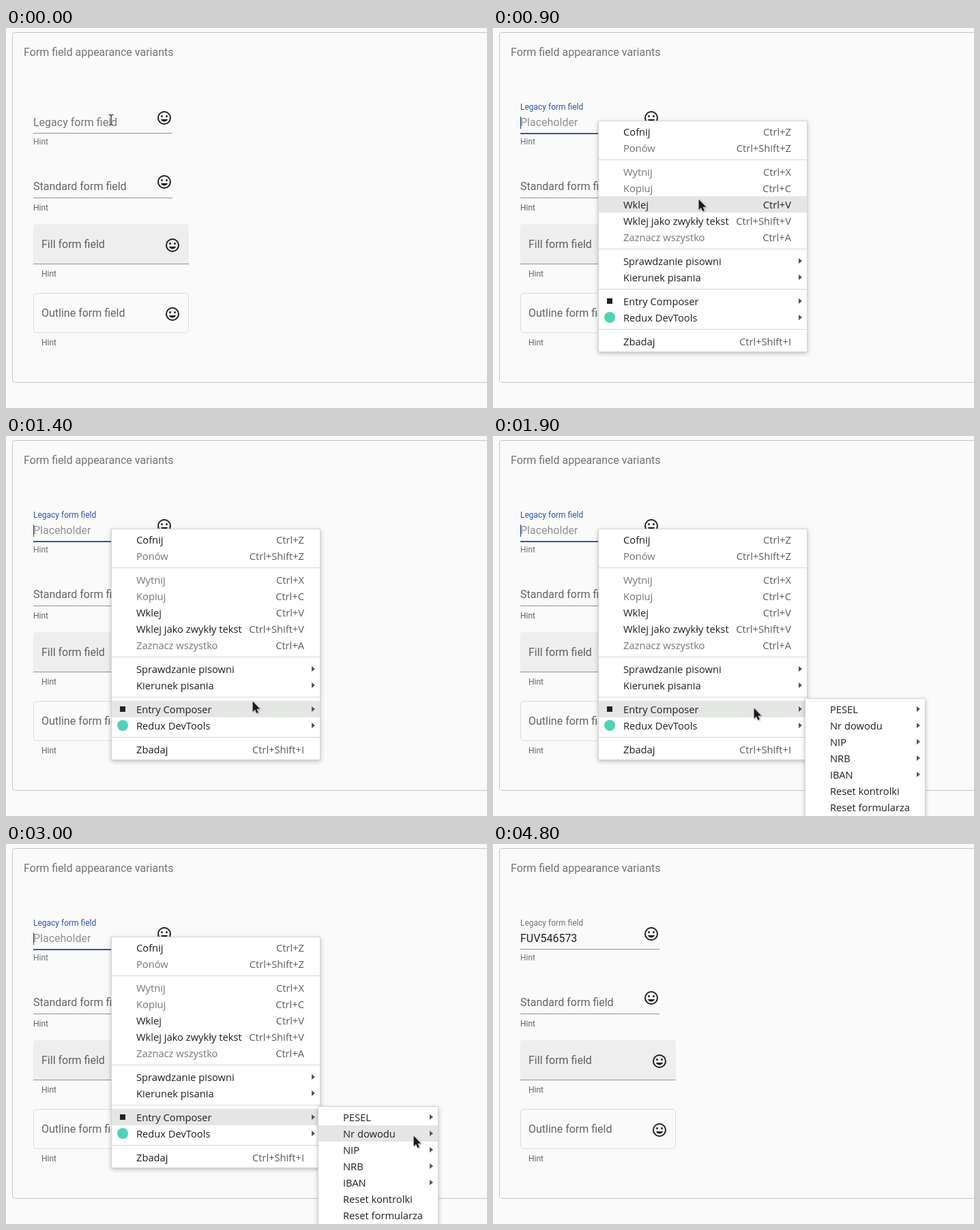
An HTML page that plays this animation: 705 by 558 pixels, repeating every 5.5 s.

```html
<!DOCTYPE html>
<html lang="en">
<head>
<meta charset="utf-8">
<title>Form field appearance variants</title>
<style>
  html, body { margin: 0; width: 100%; height: 100%; overflow: hidden; background: #fafafa; }
  svg { display: block; width: 705px; height: 558px; font: 16px Roboto, sans-serif; }
  text { white-space: pre; }
  .soft { fill: rgba(0, 0, 0, .54); }
  .label { fill: rgba(0, 0, 0, .6); }
  .hint { font-size: 12px; }
  .ink { fill: #212121; }
  .menu { font: 14.7px "Open Sans", "Noto Sans", sans-serif; fill: #1f1f1f; }
  .menu .panel { fill: #fff; stroke: #d4d4d4; filter: drop-shadow(0 2px 3px rgba(0, 0, 0, .24)); }
  .menu .hover { fill: #e4e6e4; }
  .menu .key { fill: #5c5c5c; text-anchor: end; }
  .menu .key.on { fill: #1f1f1f; }
  .menu .off { fill: #767676; }
  .menu .arrow { fill: #555; }
  #arrow { filter: drop-shadow(1px 1px 1px rgba(0, 0, 0, .3)); }
</style>
</head>
<body>
<svg id="stage" viewBox="0 0 705 558"></svg>
<script>
const LOOP = 5500, BLUE = [42, 87, 171];
const stage = document.getElementById('stage');

function add(parent, tag, attrs = {}, content) {
  const node = document.createElementNS('http://www.w3.org/2000/svg', tag);
  for (const name in attrs) node.setAttribute(name, attrs[name]);
  if (content) node.textContent = content;
  parent.append(node);
  return node;
}
const set = (node, attrs) => { for (const name in attrs) node.setAttribute(name, attrs[name]); };
const show = (node, on) => node.setAttribute('visibility', on ? 'visible' : 'hidden');
const text = (x, y, cls, content, parent = stage) => add(parent, 'text', { x, y, class: cls }, content);
const rect = (x, y, width, height, attrs, parent = stage) =>
  add(parent, 'rect', { x, y, width, height, ...attrs });

function smiley(x, y) {
  const face = add(stage, 'g', { transform: `translate(${x - 12} ${y - 12})`, class: 'ink' });
  add(face, 'circle', { cx: 12, cy: 12, r: 9, fill: 'none', stroke: '#212121', 'stroke-width': 2 });
  for (const cx of [8.5, 15.5]) add(face, 'circle', { cx, cy: 9.5, r: 1.5 });
  add(face, 'path', { d: 'M12 17.5c2.33 0 4.31-1.46 5.11-3.5H6.89c.8 2.04 2.78 3.5 5.11 3.5z' });
}

// Page
const LINE = { fill: '#919191' };
rect(9.5, 6.5, 720, 514, { rx: 4, fill: 'none', stroke: '#c4c4c4' });
text(26, 41, 'soft', 'Form field appearance variants');

rect(40, 154, 204, 1, LINE);
const underline = rect(40, 154, 204, 2, {});
const legacyLabel = text(40, 144, '', 'Legacy form field');
const placeholder = text(40, 144, '', 'Placeholder');
placeholder.setAttribute('fill', 'rgba(0,0,0,.42)');
const value = text(40, 144, 'ink', 'FUV546573');
const caret = rect(40, 130, 1, 18, { fill: '#1d3f80' });
text(40, 171, 'soft hint', 'Hint');

text(40, 238, 'label', 'Standard form field');
rect(40, 249, 204, 1, LINE);
text(40, 268, 'label hint', 'Hint');

add(stage, 'path', { d: 'M40 347V292q0-4 4-4H264q4 0 4 4V347z', fill: '#eee' });
rect(40, 346, 228, 1, LINE);
text(52, 323, 'label', 'Fill form field');
text(52, 365, 'label hint', 'Hint');

rect(40.5, 389.5, 227, 58, { rx: 4.5, fill: 'none', stroke: '#dcdcdc' });
text(52, 424, 'label', 'Outline form field');
text(52, 466, 'label hint', 'Hint');

smiley(232, 132);
smiley(232, 226);
smiley(244, 319);
smiley(244, 420);

// Menus: '-' is a separator; key '>' marks a submenu
function makeMenu(x, y, width, items) {
  const group = add(stage, 'g', { class: 'menu' });
  const panel = rect(x + .5, y + .5, width - 1, 0, { class: 'panel' }, group);
  const hover = rect(x + 1, 0, width - 2, 24, { class: 'hover' }, group);
  const rows = [];
  let top = y + 4;
  for (const item of items) {
    if (item === '-') {
      rect(x + 1, top + 5, width - 2, 1, { fill: '#d6d6d6' }, group);
      top += 11;
      continue;
    }
    const [name, key, off] = item;
    const row = { top, off };
    text(x + 37, top + 18, off ? 'off' : '', name, group);
    if (key === '>') {
      add(group, 'path', { class: 'arrow', d: `M${x + width - 13} ${top + 8}l5 4l-5 4z` });
    } else if (key) {
      row.key = text(x + width - 24, top + 18, 'key', key, group);
    }
    rows.push(row);
    top += 24;
  }
  panel.setAttribute('height', top + 3 - y);

  return {
    group,
    contains: (px, py) => px >= x && px < x + width && py >= y && py < top + 4,
    rowAt: py => rows.findIndex(r => !r.off && py >= r.top && py < r.top + 24),
    highlight(index) {
      show(hover, index >= 0);
      if (index >= 0) hover.setAttribute('y', rows[index].top);
      rows.forEach((r, i) => r.key && r.key.classList.toggle('on', i === index));
    }
  };
}

const mainMenu = makeMenu(154, 136, 307, [
  ['Cofnij', 'Ctrl+Z'], ['Ponów', 'Ctrl+Shift+Z', true], '-',
  ['Wytnij', 'Ctrl+X', true], ['Kopiuj', 'Ctrl+C', true], ['Wklej', 'Ctrl+V'],
  ['Wklej jako zwykły tekst', 'Ctrl+Shift+V'], ['Zaznacz wszystko', 'Ctrl+A', true], '-',
  ['Sprawdzanie pisowni', '>'], ['Kierunek pisania', '>'], '-',
  ['Entry Composer', '>'], ['Redux DevTools', '>'], '-',
  ['Zbadaj', 'Ctrl+Shift+I']
]);
rect(167, 397, 8, 8, { fill: '#222' }, mainMenu.group);
add(mainMenu.group, 'circle', { cx: 171, cy: 425, r: 8, fill: '#4fd3b8' });

const typeMenu = makeMenu(457, 385, 177, [
  ['PESEL', '>'], ['Nr dowodu', '>'], ['NIP', '>'], ['NRB', '>'], ['IBAN', '>'],
  ['Reset kontrolki'], ['Reset formularza']
]);
const actionMenu = makeMenu(630, 409, 140, [['Generuj'], ['Kopiuj']]);

// Each menu with its opening time and the row that opens the next one
const menus = [
  { menu: mainMenu, from: 600, opener: 9 },
  { menu: typeMenu, from: 1900, opener: 1 },
  { menu: actionMenu, from: 3200 }
];
const MENUS_CLOSE = 3700;

// Pointers
const beam = add(stage, 'g', { transform: 'translate(154 135)', fill: 'none' });
const beamShape = 'M-3.5-7.5H-1.5L0-6.5L1.5-7.5H3.5M0-6.5V6.5M-3.5 7.5H-1.5L0 6.5L1.5 7.5H3.5';
add(beam, 'path', { d: beamShape, stroke: '#fff', 'stroke-width': 3 });
add(beam, 'path', { d: beamShape, stroke: '#111', 'stroke-width': 1.2 });
const pointer = add(stage, 'g', { id: 'arrow' });
add(pointer, 'path', {
  d: 'M.5 .5V16L4 12.8L6.4 18.2L8.8 17.1L6.5 11.8H11.3z',
  fill: '#1a1a1a', stroke: '#fff', 'stroke-width': 1, 'paint-order': 'stroke'
});

// time, x, y of the pointer tip
const path = [
  [600, 160, 142], [700, 184, 163], [800, 243, 212], [900, 301, 251], [1000, 325, 298],
  [1100, 338, 331], [1200, 346, 352], [1300, 353, 371], [1400, 361, 389], [1500, 368, 394],
  [1600, 373, 397], [1700, 378, 398], [1900, 382, 399], [2000, 394, 400], [2100, 409, 401],
  [2200, 423, 401], [2300, 433, 402], [2500, 450, 403], [2600, 482, 405], [2700, 518, 409],
  [2800, 552, 416], [2900, 582, 425], [3000, 597, 428], [3100, 606, 428], [3200, 623, 427],
  [3300, 645, 422], [3400, 655, 418], [3700, 656, 418], [3800, 657, 418],
  [4100, 585, 332], [4200, 440, 192], [4300, 290, 103], [4400, 216, 74],
  [4600, 168, 44], [4700, 95, 10]
];
const POINTER_LEAVES = 4800;

// Value in force at time t from a table of [time, value] steps
const stepAt = (steps, t) => steps.reduce((found, step) => step[0] <= t ? step : found, steps[0]);
const floatSteps = [[0, 0], [500, .55], [600, 1]];
const focusSteps = [[0, 0], [500, .55], [600, 1], [4200, .5], [4300, .15], [4400, 0]];
const TYPED = 3900, BLURRED = 4200;

function drawField(t) {
  const float = stepAt(floatSteps, t)[1];
  const focus = stepAt(focusSteps, t)[1];
  const tint = BLUE.map(c => Math.round(115 + (c - 115) * focus));
  set(legacyLabel, { y: 144 - 24 * float, 'font-size': 16 - 4 * float, fill: `rgb(${tint})` });
  const width = t < BLURRED ? 204 * (.5 + focus / 2) : 204;
  set(underline, { x: 142 - width / 2, width, fill: `rgb(${BLUE})`, opacity: focus });
  placeholder.setAttribute('opacity', t < TYPED ? Math.max(0, float * 2 - 1) : 0);
  show(value, t >= TYPED);
  show(caret, t >= 500 && t < BLURRED);
  caret.setAttribute('x', t < TYPED ? 40 : 124);
}

function drawMenus(t, x, y) {
  const open = menus.filter(m => t >= m.from && t < MENUS_CLOSE);
  const active = open.findLastIndex(m => m.menu.contains(x, y));
  menus.forEach(({ menu, opener }, i) => {
    const visible = i < open.length;
    menu.group.style.display = visible ? '' : 'none';
    if (!visible) return;
    menu.highlight(i < active ? opener : i === active ? menu.rowAt(y) : -1);
  });
}

function draw(now) {
  const t = Math.floor(now % LOOP / 100) * 100;
  const [start, x, y] = stepAt(path, t);
  drawField(t);
  drawMenus(t, x, y);
  show(beam, t < start);
  show(pointer, t >= start && t < POINTER_LEAVES);
  pointer.setAttribute('transform', `translate(${x} ${y})`);
}

const begin = performance.now();
function tick() {
  draw(performance.now() - begin);
  requestAnimationFrame(tick);
}
tick();
</script>
</body>
</html>
```
